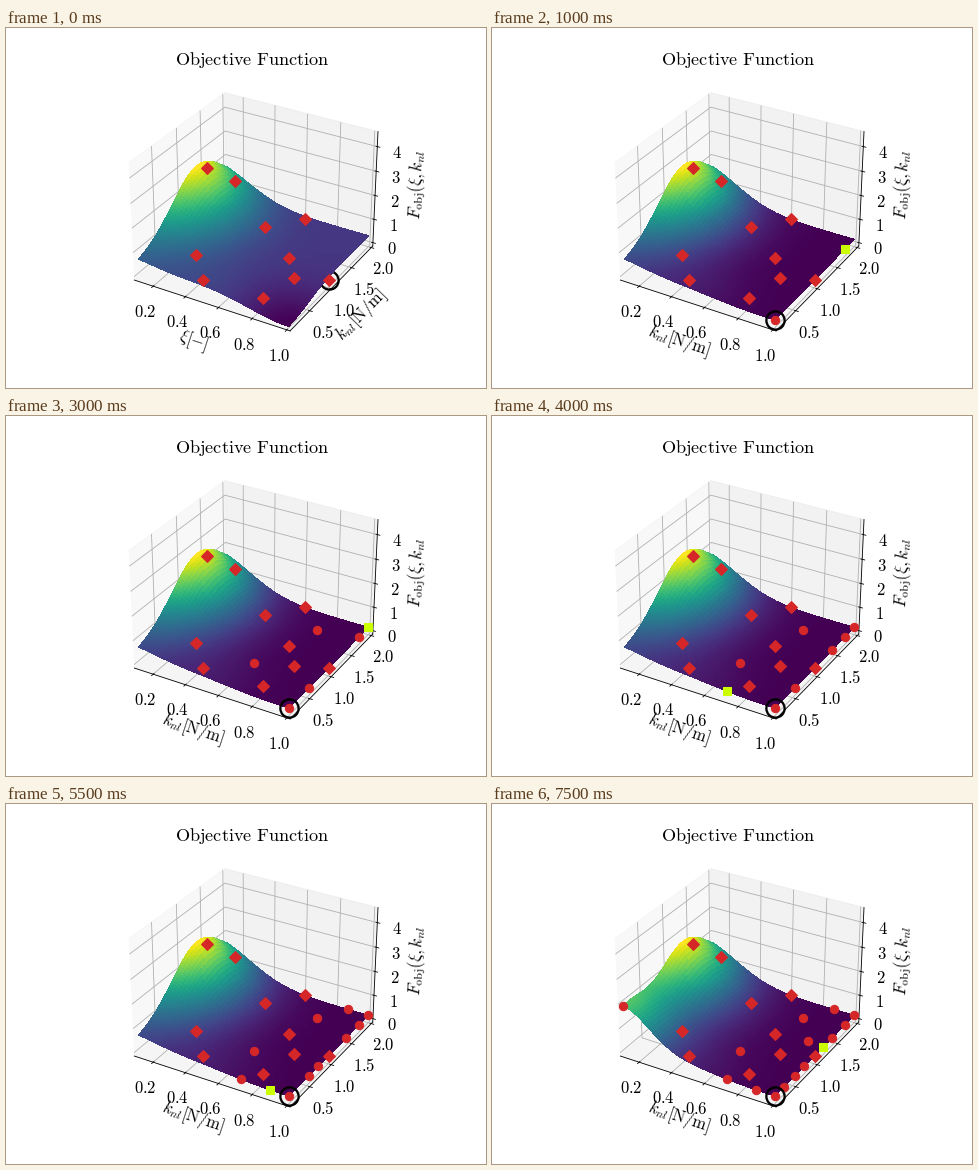
A matplotlib script that plays this animation: 480 by 360 pixels, repeating every 8000 ms.

```python
import numpy as np
import matplotlib.pyplot as plt
from matplotlib.animation import FuncAnimation

FRAMES, STEP = 16, 500
RED, LIME = "#d62728", "#ccff00"
STIFFNESS = r"$k_{nl}\mathrm{[N/m]}$"

plt.rcParams.update({
    "mathtext.fontset": "cm",
    "font.size": 16,
    "axes.titlesize": 17.5,
})

# Evaluated points (s, t) in the unit square, heights follow from the model
DESIGN = [(0.04, 0.7), (0.14, 0.87), (0.28, 0.18), (0.41, 0.05), (0.43, 0.73),
          (0.56, 1), (0.69, 0.56), (0.77, 0.11), (0.82, 0.39), (1, 0.48)]
SAMPLES = [(1, 0), (1, 0.87), (1, 0.24), (0.75, 0.81), (0.61, 0.29),
           (1, 1), (1, 0.7), (0.69, 0), (1, 0.35), (0.86, 1),
           (0.88, 0), (0, 0), (0.89, 0.6), (1, 0.11), (1, 0.59)]


def model(s, t, n):
    """Surrogate height at (s, t) after n new samples."""
    def bump(s0, t0, ws, wt):
        return np.exp(-(s - s0) ** 2 / ws - (t - t0) ** 2 / wt)

    decay = np.exp(-1.5 * s - 7 * s ** 2)
    ridge = np.exp(-(t - 0.66) ** 2 / 0.165)
    z = 0.17 + decay * (0.38 + 2.05 * ridge) + 0.13 * bump(0.45, 0, 0.08, 0.1)
    if n == 0:
        z += 0.16 * (1 - np.exp(-(s / 0.4) ** 2)) - 0.42 * bump(1, 0, 0.1, 0.1)
    elif n == 1:
        z += 0.17 * bump(1, 1, 0.3, 0.15)
    elif n >= 12:
        z += 1.2 * bump(0, 0, 0.065, 0.085)
    return z


def to_data(s, t, n):
    return 0.1 + 0.9 * s, 0.1 + 1.9 * t, model(s, t, n)


fig = plt.figure(figsize=(6.4, 4.8), dpi=75, facecolor="white")
ax = fig.add_subplot(projection="3d")
ax.set_title(r"$\mathrm{Objective\ Function}$")
ax.set(xlim=(0.08125, 1.01875), ylim=(0.0604, 2.0396), zlim=(-0.145, 4.6))
ax.set_xticks(np.arange(1, 6) / 5)
ax.set_yticks(np.arange(1, 5) / 2)
ax.set_zticks(range(5))
for axis, digits in ((ax.xaxis, 1), (ax.yaxis, 1), (ax.zaxis, 0)):
    axis.set_major_formatter(lambda v, _, d=digits: f"${v:.{d}f}$")
ax.set_zlabel(r"$F_{\mathrm{obj}}(\xi, k_{nl}$")

mesh = np.meshgrid(np.linspace(0, 1, 51), np.linspace(0, 1, 51))


def markers(marker, color, zorder, **kw):
    style = dict(ls="none", marker=marker, color=color, ms=8) | kw
    return ax.plot([], [], [], zorder=zorder, **style)[0]


def place(line, points):
    s, t = np.array(points, float).reshape(-1, 2).T
    line.set_data_3d(*to_data(s, t, len(SAMPLES)))


start = markers("D", RED, 20)
past = markers("o", RED, 21)
current = markers("s", LIME, 22)
best = markers("o", "black", 23, ms=17.5, mew=2.2, mfc="none")
place(start, DESIGN)


def update(n):
    for c in list(ax.collections):
        c.remove()
    ax.plot_surface(*to_data(*mesh, n), cmap="viridis", rcount=51, ccount=51,
                    linewidth=0, antialiased=False)
    ax.set_xlabel(STIFFNESS if n else r"$\xi[-]$")
    ax.set_ylabel("" if n else STIFFNESS)
    place(past, SAMPLES[:max(n - 1, 0)])
    place(current, SAMPLES[n - 1:n] if n else [])
    # the first best point lies behind the surface
    place(best, [SAMPLES[0] if n else DESIGN[-1]])
    best.set_zorder(23 if n else 1)
    return []


anim = FuncAnimation(fig, update, frames=FRAMES, init_func=lambda: [],
                     interval=STEP, repeat=True, repeat_delay=0, blit=False)
plt.show()
```
